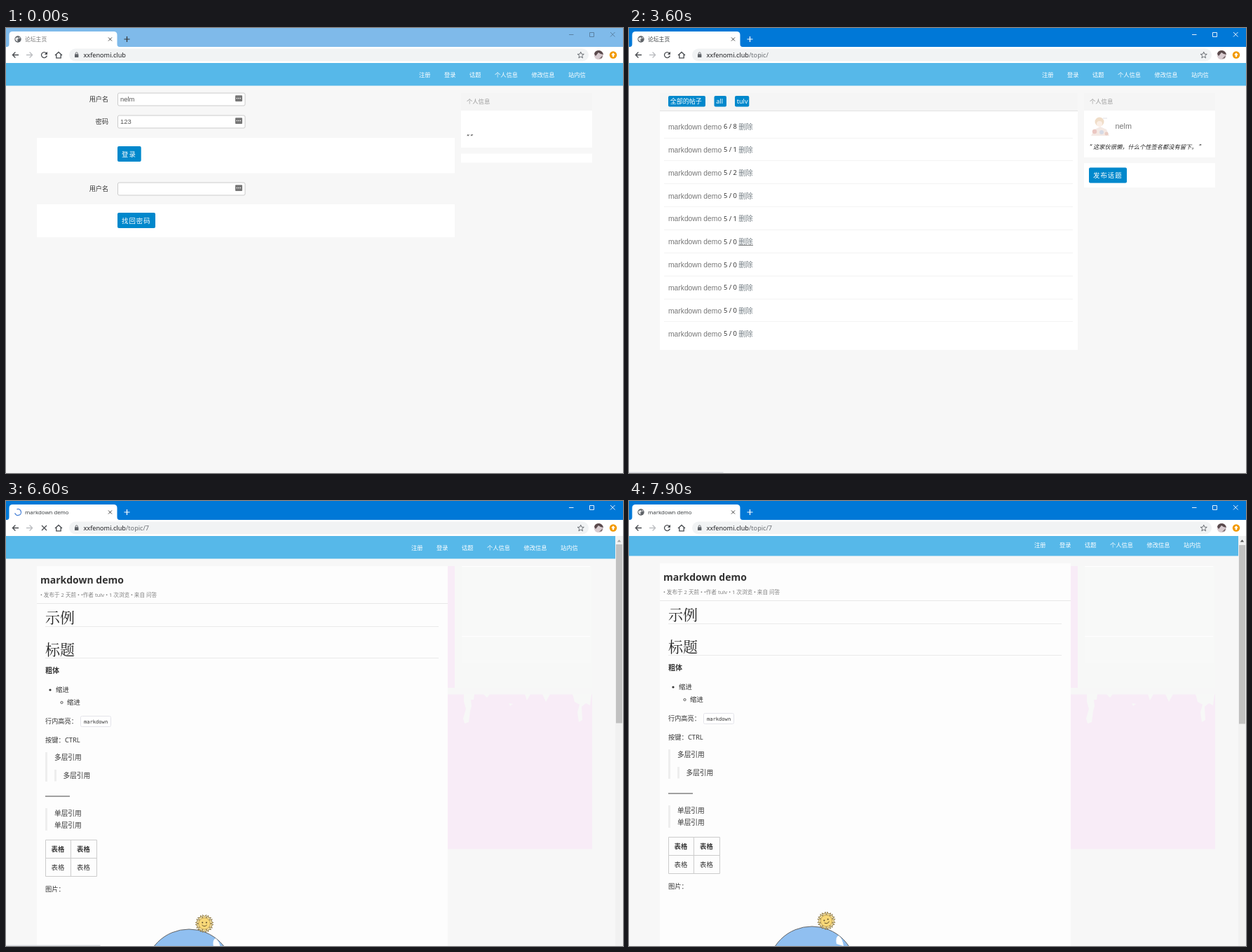
These frames come from a looping animation (880x636 px, 8 s). An HTML page:

```html
<!DOCTYPE html>
<html lang="zh-CN">
<head>
<meta charset="utf-8">
<title>论坛主页</title>
<style>
html, body { margin: 0; width: 100%; height: 100%; overflow: hidden; background: #f7f7f7; }
svg { display: block; width: 880px; height: 636px; font-family: "Noto Sans", "Noto Sans CJK SC", sans-serif; }
text { white-space: pre; }
.arial { font-family: "Liberation Sans", "Noto Sans CJK SC", sans-serif; }
.serif { font-family: "Noto Serif CJK SC", "Noto Sans CJK SC", serif; }
.mono { font-family: "DejaVu Sans Mono", monospace; }
.b { font-weight: 700; }
.i { font-style: italic; }
.btn { letter-spacing: 1px; }
</style>
</head>
<body>
<svg id="stage" viewBox="0 0 880 636"></svg>
<script>
const NS = 'http://www.w3.org/2000/svg';
const stage = document.getElementById('stage');
const USER = 'nelm', TAG = 'tulv', HOST = 'xxfenomi.club';
const BLUE = '#0088cc';

function el(parent, name, attrs) {
  const node = document.createElementNS(NS, name);
  for (const key in attrs) node.setAttribute(key, attrs[key]);
  parent.appendChild(node);
  return node;
}
const group = (parent, attrs) => el(parent, 'g', attrs);
const box = (parent, x, y, x2, y2, fill, more) =>
  el(parent, 'rect', { x, y, width: x2 - x, height: y2 - y, fill, ...more });
const disc = (parent, cx, cy, r, fill, more) => el(parent, 'circle', { cx, cy, r, fill, ...more });
const shape = (parent, d, fill, more) => el(parent, 'path', { d, fill, ...more });
const line = (parent, d, stroke, width = 1) =>
  shape(parent, d, 'none', { stroke, 'stroke-width': width });
function text(parent, x, y, str, size, fill, cls = '', more) {
  const node = el(parent, 'text', { x, y, 'font-size': size, fill, class: cls, ...more });
  node.textContent = str;
  return node;
}
function button(parent, x, y, x2, label) {
  const face = box(parent, x, y, x2, y + 22, BLUE, { rx: 2 });
  text(parent, x + 6, y + 14.6, label, 9.4, '#fff', 'btn');
  return face;
}
const show = (node, on) => node.setAttribute('visibility', on ? 'inherit' : 'hidden');

// Site navigation bar
function nav(parent, shift) {
  box(parent, 0, 40, 880, 82.5, '#56b8e9');
  const items = [[589, '注册'], [625, '登录'], [661, '话题'], [697, '个人信息'], [749.5, '修改信息'], [802, '站内信']];
  for (const [x, label] of items) text(parent, x - shift, 70, label, 8.25, '#fff');
}

function sideHead(parent) {
  box(parent, 649, 93, 836, 118, '#f5f5f5');
  text(parent, 657, 108.3, '个人信息', 8.3, '#999');
}

// Login page
const login = group(stage);
nav(login, 0);
box(login, 44, 157, 640, 207.5, '#fff');
box(login, 44, 252, 640, 299, '#fff');
function field(y, label, value) {
  text(login, 146, y + 12.7, label, 9.1, '#333', '', { 'text-anchor': 'end' });
  box(login, 159.5, y + .5, 341, y + 18.5, '#fff', { rx: 2, stroke: '#ccc' });
  text(login, 163, y + 12.7, value, 9.4, '#555', 'arial');
  const icon = box(login, 327, y + 3.7, 337, y + 12.5, '#777', { rx: 1 });
  for (const x of [329.3, 331.8, 334.3]) disc(login, x, y + 8, .8, '#fff');
  return icon;
}
field(92.5, '用户名', USER);
field(124.5, '密码', '123');
const keyIcon = field(220.5, '用户名', '');
const loginBtn = button(login, 159, 169, 192.7, '登录');
button(login, 159, 264, 213, '找回密码');
sideHead(login);
box(login, 649, 118, 836, 171, '#fff');
text(login, 657, 159, '“ ”', 8.3, '#222', 'i');
box(login, 649, 179.5, 836, 192.5, '#fff');

// Topic list
const list = group(stage);
nav(list, 0);
box(list, 44, 93, 640, 119, '#f5f5f5');
line(list, 'M44 118.5H640', '#e2e2e2');
const panel = box(list, 44, 119, 640, 460, '#fff');
for (const [x, x2, label] of [[56, 109, '全部的帖子'], [121.5, 139, 'all'], [151, 171.3, TAG]]) {
  box(list, x, 97, x2, 112.5, BLUE, { rx: 2 });
  text(list, x + 2.8, 108.4, label, 9, '#fff');
}
const PITCH = 32.87;
let lastRow;
['6 / 8', '5 / 1', '5 / 2', '5 / 0', '5 / 1', '5 / 0', '5 / 0', '5 / 0', '5 / 0', '5 / 0'].forEach((count, i) => {
  const y = 145 + i * PITCH;
  lastRow = group(list);
  text(lastRow, 56, y, 'markdown demo', 10.3, '#777', 'arial');
  text(lastRow, 135, y - .7, count, 9.3, '#333');
  text(lastRow, 156.3, y, '删除', 10.3, '#778087');
  if (i < 9) line(list, `M50 ${Math.floor(y + 12) + .5}H633`, '#f3f3f3');
});
const underline = box(list, 0, 0, 1, 1, '#777');
sideHead(list);
box(list, 649, 118, 836, 185, '#fff');
const figure = group(list, { opacity: .75 });
shape(figure, 'M659 154L664 145L672 141L681 145L685 154Z', '#f1e2dc');
disc(figure, 671, 134, 6.5, '#ecd2b6');
disc(figure, 671, 137, 4, '#faeade');
disc(figure, 664, 148, 3.2, '#e5b5ae');
disc(figure, 674, 149, 3, '#c9cedd');
disc(figure, 681, 151, 2.5, '#e3bdb0');
line(figure, 'M676 129H682', '#d5d5dd');
text(list, 693.5, 144, USER, 10.8, '#777', 'arial');
text(list, 657, 173, '“ 这家伙很懒，什么个性签名都没有留下。 ”', 8.25, '#222', 'i');
box(list, 649, 193, 836, 228, '#fff');
button(list, 656, 199.5, 710, '发布话题');

// Markdown article
const doc = group(stage);
const body = group(doc);
box(body, 44, 93, 630, 660, '#fdfdfd');
nav(body, 11);
text(body, 49, 118, 'markdown demo', 14, '#333', 'b');
text(body, 49, 136.7, `• 发布于 2 天前 • •作者 ${TAG} • 1 次浏览 • 来自 问答`, 7.6, '#838383');
line(body, 'M44 146.5H630', '#e8e8e8');
text(body, 56, 174.3, '示例', 21, '#222', 'serif');
text(body, 56, 219.8, '标题', 21, '#222', 'serif');
line(body, 'M56 179.5H617M56 224.5H617', '#eaeaea');
text(body, 56, 246.3, '粗体', 10, '#333', 'b');
disc(body, 63, 270, 1.6, '#333');
text(body, 71, 273.2, '缩进', 9.4, '#333');
disc(body, 79.5, 288, 1.6, 'none', { stroke: '#333', 'stroke-width': .8 });
text(body, 87, 291.2, '缩进', 9.4, '#333');
text(body, 56, 317.5, '行内高亮：', 9.2, '#333');
box(body, 106.5, 307.5, 149.5, 322.5, '#fff', { rx: 2, stroke: '#e4e4ea' });
text(body, 111, 317.6, 'markdown', 7.1, '#333', 'mono');
text(body, 56, 344.6, '按键：CTRL', 9.3, '#333');
box(body, 56, 359, 59, 401, '#eee');
box(body, 69, 384, 72, 400.5, '#eee');
box(body, 56, 439, 59, 471, '#eee');
for (const [x, y, str] of [[69, 370.2, '多'], [81.5, 395.8, '多'], [69, 450.3, '单'], [69, 466.5, '单']])
  text(body, x, y, str + '层引用', 9.7, '#333');
line(body, 'M56 422H91', '#444');
line(body, 'M56.5 484.5H129.5V536.5H56.5ZM56.5 510.5H129.5M92.5 484.5V536.5', '#ccc');
for (const x of [64.5, 101]) {
  text(body, x, 501, '表格', 9.4, '#333', 'b');
  text(body, x, 527.2, '表格', 9.4, '#333');
}
text(body, 56, 558, '图片：', 9.3, '#333');
disc(body, 261, 675, 63, '#90bff0', { stroke: '#666', 'stroke-width': 1 });
shape(body, 'M296 637Q294 627 299 625Q305 630 306 640Z', '#fff');
const sun = group(body);
for (let k = 0; k < 10; k++)
  shape(sun, 'M-2.4 -7.5L-2.6 -12.5L0 -10.3L2.6 -12.5L2.4 -7.5', '#f8e3a0',
    { stroke: '#86713d', 'stroke-width': .8, transform: `rotate(${k * 36})` });
disc(sun, 0, 0, 8.3, '#f8d878', { stroke: '#b08f42', 'stroke-width': .7 });
disc(sun, -2.8, -1.5, 1, '#5b4a28');
disc(sun, 2.8, -1.5, 1, '#5b4a28');
line(sun, 'M-3.5 2Q0 5.5 3.5 2', '#5b4a28', .9);

box(doc, 640, 93, 836, 267, '#f7f8f7');
box(doc, 650, 93, 835, 232, '#f8f9f8');
line(doc, 'M650 93.5H833M650 193.5H833', '#fff');
box(doc, 630, 93, 640, 267, '#f8ecf7');
box(doc, 630, 276.5, 836, 497.5, '#f8ecf7');
shape(doc, 'M653 276H668L667 284H663L664 293L662 300L660 316L654 318L652 311L656 297L653 287Z', '#f7f8f7');
shape(doc, 'M808 276H835L833 292L827 289L821 294L822 313L817 316L815 302L818 291L811 287Z', '#f7f8f7');
shape(doc, 'M681 276H690L686 281ZM717 289L723 290L719 293ZM740 276H748L743 285ZM765 276H776L770 287Z', '#f7f8f7');
box(doc, 869, 50, 880, 636, '#f1f1f1');
const thumb = box(doc, 870, 62, 879, 317.5, '#c1c1c1');
const upArrow = shape(doc, 'M871.8 58.5L874.5 55.3L877.2 58.5Z', '#a3a3a3');

// Browser frame
const frame = group(stage);
const titleBar = box(frame, 0, 0, 880, 27, '#7fbaea');
shape(frame, 'M1 27Q4.5 27 4.5 23V10Q4.5 5 9.5 5H153.5Q158.5 5 158.5 10V23Q158.5 27 162 27Z', '#fff');
box(frame, 0, 27, 880, 50, '#fff');
const tabTitle = text(frame, 27, 19, '', 7.8, '#5f6368');
line(frame, 'M146 13.5L151 18.5M151 13.5L146 18.5', '#444');
const plus = line(frame, 'M168.5 16H176.5M172.5 12V20', '#333', 1.2);
const controls = line(frame, 'M803 9.5H809.5M832.5 6.5H838.5V12.5H832.5ZM862 6L868.5 12.5M868.5 6L862 12.5', '#fff', .9);
const globe = group(frame);
disc(globe, 17, 16, 4.7, '#5f6368');
shape(globe, 'M14 14L17 13L18 15L16 17L17 19L15 19L13 16ZM18.5 12.5L20.5 14L19 15.5Z', '#e4e5e6');
const spinner = disc(frame, 17, 16, 4.5, 'none', { 'stroke-width': 1.3 });

line(frame, 'M18 38.5H9.5M13.4 34.5L9.4 38.5L13.4 42.5', '#4a4d51', 1.3);
line(frame, 'M29 38.5H37.5M33.6 34.5L37.6 38.5L33.6 42.5', '#bcbec1', 1.3);
const reload = group(frame);
line(reload, 'M57.6 36A4 4 0 1 0 58.4 39.5', '#4a4d51', 1.3);
shape(reload, 'M59 33.8V38H54.8Z', '#4a4d51');
const stop = line(frame, 'M51 35L58 42M58 35L51 42', '#4a4d51', 1.3);
line(frame, 'M70 39L75 34.4L80 39M71.8 38V42.8H78.2V38', '#4a4d51', 1.3);
box(frame, 90, 29.5, 831, 47.5, '#f1f3f4', { rx: 9 });
box(frame, 98, 37.3, 103.4, 42, '#5f6368', { rx: .6 });
line(frame, 'M99.2 37.5V36.3A1.5 1.5 0 0 1 102.2 36.3V37.5', '#5f6368', .9);
const url = text(frame, 110.5, 41.8, '', 9.15, '#202124');
el(url, 'tspan', {}).textContent = HOST;
const path = el(url, 'tspan', { fill: '#6b6f73' });
let star = '';
for (let k = 0; k < 10; k++) {
  const a = k * Math.PI / 5, r = k % 2 ? 2.1 : 4.8;
  star += (k ? 'L' : 'M') + (819.7 + r * Math.sin(a)).toFixed(1) + ' ' + (38.9 - r * Math.cos(a)).toFixed(1);
}
line(frame, star + 'Z', '#5f6368', .9);
disc(frame, 845.3, 38.5, 6.6, '#d9ccd0');
shape(frame, 'M839 37Q840 32 846 32Q851 33 852 38L848 37L845 35L841 40Z', '#5a4a4c');
shape(frame, 'M846 44L851 39L850 43Z', '#7b6a6c');
disc(frame, 866, 38.5, 5.2, '#f29900');
shape(frame, 'M866 35.3L869 38.6H867.2V41.2H864.8V38.6H863Z', '#fff');
const status = box(stage, 0, 634.6, 134.5, 636, '#dadce0');

// [from, to] spans of page loading, in ms
const LOADING = [[1300, 1700], [4200, 4500], [6400, 7200]];
// [start, row, link] of the hovered link
const HOVER = [[0], [2700, 4, 'del'], [2800, 5, 'del'], [2900, 5, 'open'], [3600, 5, 'del'],
  [4400], [4900, 5, 'del'], [5000], [5100, 5, 'open']];

function draw(ms) {
  const t = Math.floor(ms / 100) * 100;
  const onList = t >= 1500 && t < 6600, onDoc = t >= 6600;
  show(login, t < 1500);
  show(list, onList);
  show(doc, onDoc);

  const active = t >= 1200;
  titleBar.setAttribute('fill', active ? '#0078d7' : '#7fbaea');
  plus.setAttribute('stroke', active ? '#fff' : '#333');
  controls.setAttribute('stroke', active ? '#fff' : '#567b9b');
  tabTitle.setAttribute('fill', active ? '#3c4043' : '#777');
  tabTitle.textContent = onDoc ? 'markdown demo' : '论坛主页';
  path.textContent = onDoc ? '/topic/7' : onList ? '/topic/' : '';

  keyIcon.setAttribute('fill', t === 600 ? '#333' : '#777');
  loginBtn.setAttribute('fill', t >= 900 ? '#0052cc' : BLUE);

  const span = LOADING.find(([from, to]) => t >= from && t < to);
  show(globe, !span);
  show(reload, !span);
  show(spinner, span);
  show(stop, span);
  if (span) {
    const age = t - span[0];
    const arc = age < 100 ? 2 : onDoc ? 21 : 4 + age / 40;
    spinner.setAttribute('stroke', onDoc ? '#4a83d8' : '#7a7d82');
    spinner.setAttribute('stroke-dasharray', `${arc} 40`);
    spinner.setAttribute('transform', `rotate(${-100 + (onDoc ? (t - 6700) * .9 + 80 : -age * .7)} 17 16)`);
  }

  const short = t >= 4400;
  panel.setAttribute('height', short ? 308 : 341);
  show(lastRow, !short);
  const [, row, link] = HOVER.filter(h => t >= h[0]).pop();
  show(underline, link);
  if (link) {
    underline.setAttribute('x', link === 'del' ? 156.3 : 56);
    underline.setAttribute('width', link === 'del' ? 20.7 : 76);
    underline.setAttribute('y', row === 4 ? 277 : 310);
  }
  show(status, t >= 2700 && t < 7200);

  const scrolled = t >= 7900;
  body.setAttribute('transform', `translate(0 ${scrolled ? -4 : 0})`);
  thumb.setAttribute('y', scrolled ? 63 : 62);
  upArrow.setAttribute('fill', scrolled ? '#505050' : '#a3a3a3');
  const roll = Math.max(0, t - 6700) / 1200;
  sun.setAttribute('transform', `translate(${283 - 1.5 * roll} 604) rotate(${-18 * roll})`);
}

function tick() {
  draw(performance.now() % 8000);
  requestAnimationFrame(tick);
}
tick();
</script>
</body>
</html>
```
